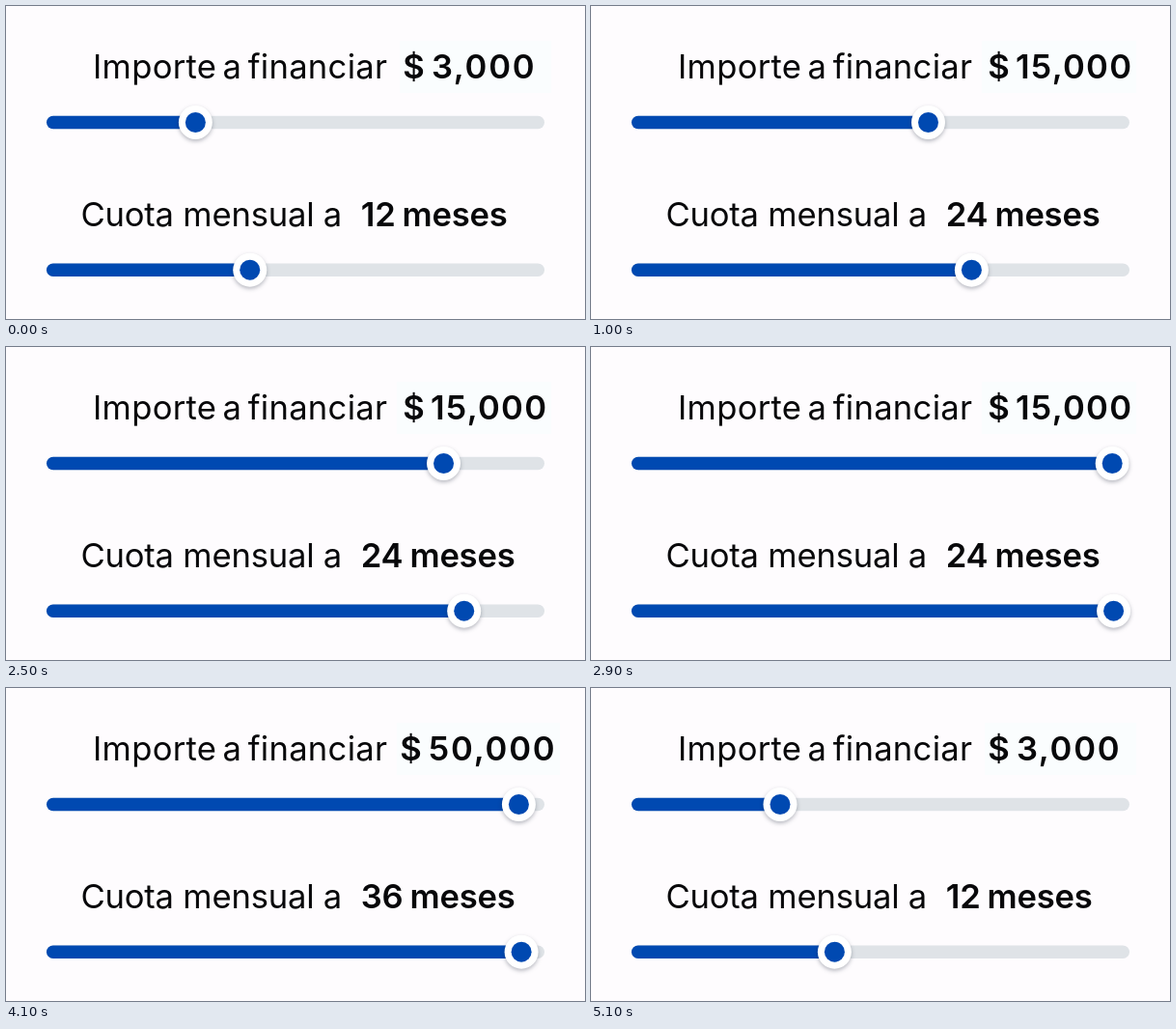
An HTML page for the animation above (5.9 s loop, 600 by 324 pixels).

```html
<!DOCTYPE html>
<html lang="es">
<head>
<meta charset="utf-8">
<title>Simulador de cuotas</title>
<style>
  html, body { margin: 0; width: 100%; height: 100%; overflow: hidden; background: #fefcfe; }
  svg { display: block; width: 100%; height: 100%; }
  text { font-family: Inter, "Open Sans", sans-serif; font-size: 34.6px; fill: #08080a; }
  .label { letter-spacing: 0.3px; word-spacing: -3.7px; }
  .value { font-weight: 600; word-spacing: -5px; }
  .term { letter-spacing: -0.2px; word-spacing: -1.5px; }
  .fill { fill: #0049b1; }
  .track { fill: #dfe3e7; }
  .knob { fill: #fff; filter: drop-shadow(0 2px 2px rgba(20, 30, 50, .3)); }
</style>
</head>
<body>
<svg viewBox="0 0 600 324">
  <rect width="600" height="324" fill="#fefcfe"/>
  <rect id="patch" y="36" height="54" fill="#fafdfe"/>
  <text class="label" x="90" y="74.9">Importe a financiar</text>
  <text id="amount" class="value" y="74.9"></text>
  <text x="77.5" y="227.9" letter-spacing="-0.2">Cuota mensual a</text>
  <text id="term" class="value term" x="367.8" y="227.9"></text>
  <g id="sliders"></g>
</svg>
<script>
  const LOOP = 5900, STEP = 100, LEFT = 42, RIGHT = 558;

  // Each stop: slider positions, labels, label offset and spacing, patch extent
  const stops = [
    { knobs: [196, 252.4], amount: "$ 3,000", term: "12 meses", x: 411.3, gap: 1.7, patch: [408, 565] },
    { knobs: [349.5, 394.4], amount: "$ 15,000", term: "24 meses", x: 411.3, gap: 1.3, patch: [405, 565] },
    { knobs: [542, 543], amount: "$ 50,000", term: "36 meses", x: 408.3, gap: 1.8, patch: [405, 574] }
  ];
  const moves = [
    { from: 0, to: 1, start: -31, length: 1000, swap: 1000 },
    { from: 1, to: 2, start: 1990, length: 970, swap: 3000 },
    { from: 2, to: 0, start: 3988, length: 1000, swap: 5000 }
  ];

  const byId = id => document.getElementById(id);
  const patch = byId("patch"), amount = byId("amount"), term = byId("term");

  function add(tag, attrs) {
    const el = document.createElementNS("http://www.w3.org/2000/svg", tag);
    for (const key in attrs) el.setAttribute(key, attrs[key]);
    return byId("sliders").appendChild(el);
  }

  function makeSlider(y) {
    const bar = { x: LEFT, y: y - 6.75, height: 13.5, rx: 6.75 };
    add("rect", { ...bar, width: RIGHT - LEFT, class: "track" });
    const fill = add("rect", { ...bar, class: "fill" });
    const knob = add("circle", { cy: y, r: 17.5, class: "knob" });
    const dot = add("circle", { cy: y, r: 10.5, class: "fill" });
    return x => {
      fill.setAttribute("width", x - LEFT);
      knob.setAttribute("cx", x);
      dot.setAttribute("cx", x);
    };
  }

  const sliders = [makeSlider(120.5), makeSlider(273.2)];
  const ease = s => (1 - Math.cos(Math.PI * Math.min(1, Math.max(0, s)))) / 2;

  function showLabels(stop) {
    amount.textContent = stop.amount;
    amount.setAttribute("x", stop.x);
    amount.setAttribute("letter-spacing", stop.gap);
    term.textContent = stop.term;
    patch.setAttribute("x", stop.patch[0]);
    patch.setAttribute("width", stop.patch[1] - stop.patch[0]);
  }

  function draw(time) {
    const t = Math.floor((time % LOOP) / STEP) * STEP;
    const move = moves.filter(m => m.start <= t).pop();
    const a = stops[move.from], b = stops[move.to];
    const p = ease((t - move.start) / move.length);
    sliders.forEach((place, i) => place(a.knobs[i] + (b.knobs[i] - a.knobs[i]) * p));
    showLabels(t < move.swap ? a : b);
  }

  const origin = performance.now();
  function tick() {
    draw(performance.now() - origin);
    requestAnimationFrame(tick);
  }
  tick();
</script>
</body>
</html>
```
